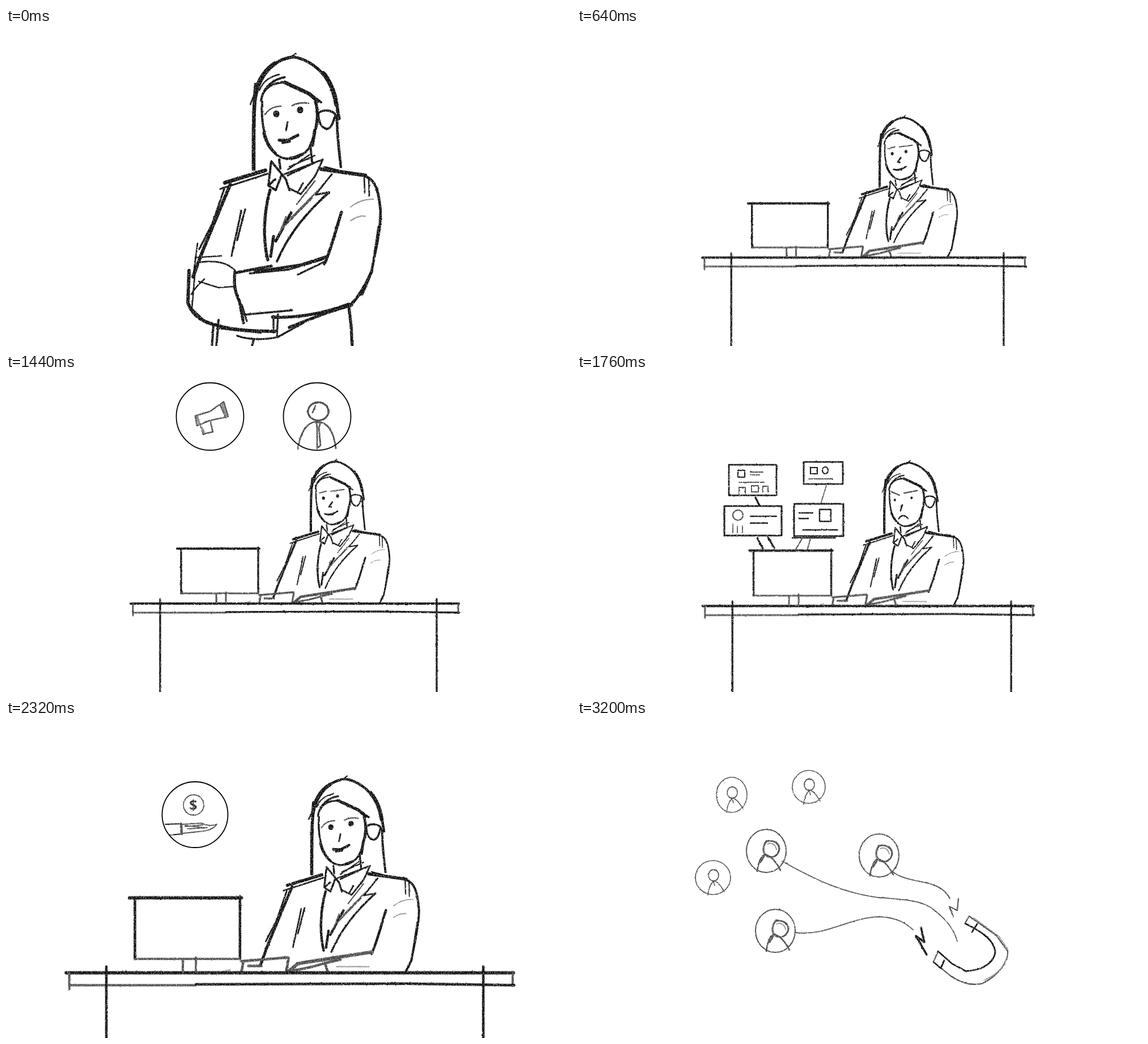
Animation, 997 px wide and 561 px high, one loop 3360 ms. Source, as an HTML page:

```html
<!DOCTYPE html>
<html lang="en">
<head>
<meta charset="utf-8">
<title>Storyboard sketches</title>
<style>
html, body { margin: 0; width: 100%; height: 100%; overflow: hidden; background: #fff; }
svg { display: block; width: 100%; height: 100%; }
.scene { opacity: 0; }
path, circle, ellipse { fill: none; stroke-linecap: round; stroke-linejoin: round; }
text { font-family: "Open Sans", "Noto Sans", sans-serif; fill: #333; }
</style>
</head>
<body>
<svg id="stage" viewBox="0 0 997 561"></svg>
<script>
const LOOP = 3360;
const INK = '#141414', GREY = '#4c4c4c', PALE = '#888';

const ink = (width, d, color = INK) =>
  `<path d="${d}" stroke="${color}" stroke-width="${(width * 1.1).toFixed(2)}"/>`;
const brush = (width, d, color) => ink(width * 1.2, d, color);
const oval = (x, y, rx, ry = rx, width = 2, color = INK) =>
  `<ellipse cx="${x}" cy="${y}" rx="${rx}" ry="${ry}" stroke="${color}" stroke-width="${width * 1.1}"/>`;
const place = (scale, x, y, ...parts) =>
  `<g transform="translate(${x} ${y}) scale(${scale})">${parts.join('')}</g>`;
const rough = (...parts) => `<g filter="url(#pencil)">${parts.join('')}</g>`;
const box = (x, y, w, h) => `M${x} ${y}h${w}v${h}h${-w}z`;

const pencil = `<defs><filter id="pencil" filterUnits="userSpaceOnUse" x="0" y="0" width="997" height="561"
  color-interpolation-filters="sRGB">
  <feTurbulence type="fractalNoise" baseFrequency=".2" numOctaves="2" seed="4" result="wobble"/>
  <feDisplacementMap in="SourceGraphic" in2="wobble" scale="2.2" xChannelSelector="R" yChannelSelector="G" result="line"/>
  <feTurbulence type="fractalNoise" baseFrequency=".5" numOctaves="2" seed="9"/>
  <feColorMatrix values="0 0 0 0 0  0 0 0 0 0  0 0 0 0 0  0 0 0 -2.2 2.1" result="grain"/>
  <feComposite in="line" in2="grain" operator="in"/>
</filter></defs>`;

// Woman: head, jacket and upper arms
const hair =
  brush(4, 'M439 132C444 88 470 54 508 51C545 58 574 90 582 125L588 160') +
  brush(6, 'M442 108C449 85 460 72 474 63M560 80C574 97 580 115 583 135') +
  brush(2, 'M497 55L511 45M431 135L444 102M447 110C455 92 466 86 482 82') +
  brush(5, 'M441 100C436 150 437 200 437 249') +
  brush(3.5, 'M584 155C584 190 588 220 591 245') +
  brush(3, 'M450 128C453 108 466 97 490 96C515 103 540 118 556 131M455 112C465 96 478 89 492 87') +
  brush(5, 'M492 96L535 116L550 129');
const head =
  brush(3, 'M452 130C450 160 454 195 470 215C480 230 495 233 512 229C530 222 541 210 544 180') +
  brush(4, 'M546 130C552 148 549 170 545 182L541 207M455 185C458 200 465 212 476 222') +
  brush(3, 'M551 150C560 143 575 145 581 152C578 165 575 177 566 178C556 176 551 165 551 150') +
  brush(3, 'M482 232L484 248M537 206L540 236') +
  brush(2, 'M497 250L535 224M500 245L545 225M495 232L530 219');
const jacket =
  brush(3, 'M468 235L463 278L476 286L486 260M468 235L494 267L500 286M463 278L475 267') +
  brush(2.5, 'M491 258L559 232L545 262L520 293L500 283M497 260L546 237M515 290L524 274') +
  brush(5, 'M386 273L458 251M556 249L634 260') +
  brush(2.5, 'M378 284L462 257M562 245L585 251M575 258L546 294L570 290') +
  brush(4, 'M466 286C456 320 452 370 462 409M472 368L467 403M503 326L476 376') +
  brush(3, 'M570 290C534 322 500 360 478 412') +
  brush(2, 'M550 287L503 335M540 300L486 355M494 333L483 362M545 270L513 311', GREY) +
  brush(4.5, 'M396 276C377 320 360 362 344 401L330 439') +
  brush(2.5, 'M385 284L364 345L341 390M415 322C410 350 402 380 398 402M422 320L408 374') +
  brush(3.5, 'M635 262C651 268 658 285 661 325C661 360 650 400 645 430L634 452') +
  brush(2, 'M632 260L633 291M640 265L641 296M657 350L648 410') +
  brush(1.4, 'M608 316C620 306 635 302 648 302M608 340C618 333 626 331 634 332', PALE) +
  brush(4, 'M592 325C582 355 574 390 562 416');
const woman = face => hair + head + jacket + face;

const eyes = (x1, y1, x2, y2, r) => ink(r * 2, `M${x1} ${y1}v1M${x2} ${y2}v1`);
const smile =
  eyes(477, 151, 519, 144, 5) +
  brush(2, 'M457 153C464 142 473 138 485 138M505 137C514 132 523 131 534 133', GREY) +
  brush(2.5, 'M497 166L494 181') + brush(4, 'M482 198L498 198L515 189M488 202L500 200');
const working =
  eyes(473, 155, 513, 149, 3.8) +
  brush(2.5, 'M461 141L481 136M494 136L532 131', GREY) +
  brush(3.5, 'M498 167L489 180L495 181') + brush(3.5, 'M477 201C488 204 502 200 513 193M485 203L500 202');
const frown =
  eyes(467, 156, 514, 150, 3) +
  brush(3, 'M457 133L479 143M493 137L530 130', GREY) +
  brush(3, 'M488 170L483 186') + brush(3, 'M478 210C482 200 494 196 504 209');

const crossedArms =
  brush(4, 'M404 432L468 420M440 430L520 418L567 403M404 430C402 450 403 465 412 482L419 520') +
  brush(2.5, 'M430 433L500 426L560 408M515 435L565 411M416 488L425 517M418 506L505 498') +
  brush(2, 'M334 405L380 402M338 414C370 408 395 415 406 430M327 470C335 455 343 450 350 443M340 447L375 458L402 456') +
  brush(4.5, 'M323 428L321 485C330 510 350 520 375 525C400 534 440 535 475 535') +
  brush(2, 'M334 425L328 495L352 518M338 380L330 440M372 530L450 538') +
  brush(4, 'M470 510C515 512 560 504 605 487M500 528C540 512 570 500 610 489') +
  brush(2.5, 'M408 543C430 551 460 550 480 545L525 520M480 505L478 545M472 508L472 530') +
  brush(4, 'M634 452C625 470 615 482 605 492L609 525L611 565M645 430L628 470') +
  brush(3, 'M375 515L371 565M366 525L363 565M437 550L433 565');

// Desk with monitor and seated woman
const desk = (face, ...extras) =>
  place(0.62, 267, 122.5, woman(face)) +
  ink(4, 'M616 378L520 393L508 403', GREY) +
  ink(3, 'M512 402C540 399 555 391 575 388M447 390L507 385M447 403L449 393M456 396H473M508 386L505 402M555 392L558 402', GREY) +
  ink(1.2, 'M570 397H612M408 407L432 401', PALE) +
  ink(3.8, 'M220 405H799M302 308H447') +
  ink(2.6, 'M226 421H388M224 405V426M798 404V422', GREY) +
  ink(3, 'M388 420L660 419L800 421M272 397V575M760 397V575M309 308V387M445 306V387') +
  ink(2.6, 'M309 387H445M371 387V404M388 385V404', GREY) +
  extras.join('');

const ring = (x, y, r) => `<circle cx="${x}" cy="${y}" r="${r}" stroke="#000" stroke-width="1.8"/>`;
const megaphone =
  ink(2.4, 'M334 74L360 66L384 49L392 75L360 82L337 91ZM378 55L388 77M343 91L348 106L365 102L361 85', GREY) +
  ink(4, 'M382 53L389 74M338 76L341 89M345 95L349 103', PALE);
const applicant =
  oval(551, 66, 18, 16, 3, GREY) +
  ink(2.5, 'M515 132C519 105 530 85 548 84C570 84 579 106 582 131M548 86L555 85L552 95L555 126L549 131L549 96ZM541 68L546 56', GREY);
const payHand =
  oval(331, 150, 18, 18, 1.6, GREY) +
  '<text x="330.5" y="159" font-size="25" font-weight="700" text-anchor="middle">$</text>' +
  ink(2, 'M281 184L310 183M288 203L311 201') + ink(4, 'M309 183L310 201', GREY) +
  ink(1.8, 'M311 184L345 182C358 188 366 186 372 184C366 193 355 196 340 197L311 200M316 188L348 185M320 192L355 190M316 186L350 190', GREY);

const lowCards =
  ink(2.8, box(260, 233, 101, 52) + box(383, 229, 87, 57)) +
  ink(2.2, 'M306 251H352M306 263H336M392 245H416M392 255H408M398 275H460M380 289H456') +
  ink(2.2, box(428, 239, 20, 21)) + oval(284, 249, 9, 9, 2, GREY) +
  ink(1.6, 'M275 265V280M283 269V280M292 268V280', GREY) +
  ink(3, 'M318 289L328 308M337 288L348 307') + ink(2, 'M398 289L385 311M412 290L407 308', GREY);
const topCards =
  ink(2.5, box(268, 160, 84, 54) + box(400, 155, 69, 39)) +
  ink(2, box(284, 170, 12, 12) + box(412, 165, 12, 11)) + oval(438, 170, 5, 6) +
  ink(1.8, 'M306 173H328M306 178H322M286 191H330M409 185H451M286 212V200H297V212M308 208V197H320V208ZM328 208V198H337V208', GREY) +
  ink(3, 'M315 218L322 232') + ink(1.6, 'M440 197L431 226', GREY);

// Woman from behind, with thought bubbles
const bubbles =
  [[355, 126], [498, 99], [640, 121], [262, 238], [738, 236]].map(([x, y]) => oval(x, y, 55, 56, 2.8)).join('') +
  ink(1.8, 'M312 91L370 92M317 115H370M320 138H365M330 158H355M317 88L328 178M370 90V116', GREY) +
  oval(372, 124, 13, 14, 2.4) + ink(2.2, 'M353 180C352 150 360 140 372 138C382 140 386 155 385 180') +
  oval(489, 68, 12, 13, 2.4) + oval(488, 69, 6, 8, 1.5) +
  ink(2.2, 'M466 150C462 110 468 82 486 80C505 82 508 110 507 143M472 88L469 130M508 78L552 99M512 85L545 95M510 94L510 122') +
  ink(2.4, 'M634 92C634 80 645 78 650 88C655 98 670 92 669 105C665 122 645 120 640 112C634 106 634 100 634 92M632 125C645 140 645 150 633 157M668 115C675 130 678 145 676 155') +
  ink(2, 'M588 125L622 118M590 138L630 125M595 152L632 135M600 118C602 100 612 98 616 112L627 130M690 122C680 130 675 150 672 160') +
  ink(2, 'M222 228C228 222 233 226 230 234L224 245L248 275M248 292C248 270 258 260 265 260C275 265 276 280 274 292M262 210C272 222 285 214 306 210') +
  ink(3.4, 'M254 235L256 256L263 232L266 254L274 236L280 250L284 232L289 257L296 237L301 250L305 238L312 256') +
  oval(704, 217, 10, 10, 2.4) +
  ink(2.2, 'M696 245C694 230 700 228 704 228C712 232 712 250 708 258M718 225C724 240 726 255 721 262M725 241H792M732 222C735 205 742 205 746 216L765 237M765 208V238M777 207V240M742 270L760 250L764 266L775 254') +
  ink(1.3, 'M700 275L722 282', PALE);
const fromBehind =
  ink(4, 'M450 211H406V296L430 298M520 211H577V300L562 302') +
  ink(3, 'M325 310L430 305M566 311L675 308L692 345M311 350H430M311 350V483M333 352V443M594 355V470') +
  ink(2, 'M325 310L307 350M594 465H695M597 465L642 458', GREY) +
  ink(3.5, 'M566 352L692 345M695 348V466M691 466L694 487') +
  ink(3.5, 'M488 203C468 218 451 235 454 275C456 310 470 345 490 350C508 354 521 348 524 335C526 300 525 250 520 228C512 212 500 203 488 203') +
  ink(2, 'M485 208C462 230 450 255 452 285M508 230L517 240M470 330C480 350 505 358 520 350', GREY) +
  ink(3, 'M437 340C432 380 433 405 440 418C460 434 535 434 550 420C560 410 560 380 556 350C552 320 545 305 530 300') +
  ink(2, 'M452 280C430 290 428 320 436 350M528 281C555 278 560 300 565 325L573 378M460 312C448 330 440 360 436 400M535 292C550 295 556 320 560 360', GREY) +
  ink(4, 'M460 432L438 505M538 432L560 508') + ink(3, 'M468 432L455 488M524 432L532 490');

// Contact list
const listRow = y => place(1, 0, y,
  ink(4.4, 'M322 107H662M323 108V158M660 106V157') + ink(3.4, 'M323 157H662') +
  oval(363, 130, 20, 16, 2.6, GREY) +
  ink(3.6, 'M394 120L480 121') + ink(3, 'M394 120L600 121') + ink(1.6, 'M397 136H562', PALE));
const contactList =
  [0, 98, 197, 295].map(listRow).join('') +
  '<text x="363" y="432" font-size="20" text-anchor="middle">V</text>' +
  '<text transform="translate(750 363) rotate(-30)" font-size="43" font-style="italic">Vomu</text>' +
  ink(2, 'M733 349C708 346 680 365 671 391M669 367L670 391L694 376', GREY);

// People and magnet
const avatar = (x, y, scale = 1, thin = 1) => place(scale, x, y,
  oval(0, 0, 35, 38, 1.9 * thin, GREY) +
  ink(2.8 * thin, 'M0 -17C10 -20 23 -15 23 -3C21 8 12 13 5 10C-5 9 -9 -5 0 -17', GREY) +
  ink(1.5 * thin, 'M2 -12C10 -16 17 -10 18 -2M-4 -12C-9 0 -4 8 2 11', PALE) +
  ink(2.4 * thin, 'M-16 36C-14 20 -9 9 -2 6C8 9 18 20 25 34M-10 20L-4 10', GREY));
const smallPerson = (x, y, rx, ry) => place(1, x, y,
  oval(0, 0, rx, ry, 1.5, GREY) + oval(1, -4, 9, 10, 1.6, GREY) +
  ink(1.5, 'M-9 31C-8 18 -3 9 2 6C10 8 15 17 20 25M0 5L3 14', GREY));
const crowd = avatar(334, 231) + avatar(533, 239) + avatar(350, 372);
const magnet =
  ink(1.7, 'M362 249C420 282 470 305 530 313C580 317 610 318 630 335C655 355 665 370 671 390M556 267C575 282 600 283 620 288C640 293 652 303 658 315M385 375C440 382 480 348 535 347C565 349 580 358 593 370', GREY) +
  ink(3.2, 'M617 414L598 381L613 392L607 366') + ink(2, 'M664 347L657 329L671 336L673 315', GREY) +
  ink(2, 'M685 358L692 346L740 380L760 408C762 425 745 450 715 465C700 468 680 466 660 452L629 427L637 408', GREY) +
  ink(2.6, 'M637 408L662 430L686 443C715 442 737 428 738 408C735 390 720 376 685 359M648 424L642 438M629 427L642 438M706 360L697 374') +
  ink(1.4, 'M700 349L745 382L760 404M758 420C750 442 735 452 718 459', PALE);

const wide = [1.363, -193.7, -106], near = [1.008, 0, 1], mid = [0.97, 14.5, 4];

// [start in ms, drawing]
const scenes = [
  [0, rough(woman(smile), crossedArms)],
  [320, rough(bubbles, fromBehind)],
  [640, rough(place(0.985, 4.3, 6, desk(working)))],
  [880, rough(contactList)],
  [1200, rough(place(...mid, desk(working, megaphone))) + place(...mid, ring(360, 75, 59.5))],
  [1440, rough(desk(working, megaphone, applicant)) + ring(360, 75, 59.5) + ring(549, 75, 59.5)],
  [1760, rough(place(...near, desk(frown)), lowCards, topCards)],
  [2080, rough(place(1.04, -12, -8, desk(frown)), place(1.032, -12, -9, lowCards, topCards, place(1, 0, -57, topCards)))],
  [2320, rough(place(...wide, desk(smile)), payHand) + ring(333.5, 167, 58)],
  [2640, rough(avatar(222, 292, 2.95, 0.5), avatar(500, 292, 2.95, 0.5), avatar(778, 292, 2.95, 0.5))],
  [2880, rough(place(1, 0, -6, crowd))],
  [3200, rough(crowd, magnet, smallPerson(273, 132, 27, 31), smallPerson(409, 118, 29, 29), smallPerson(240, 278, 31, 30))],
];

const stage = document.getElementById('stage');
stage.innerHTML = pencil + scenes.map(([, art]) => `<g class="scene">${art}</g>`).join('');

stage.querySelectorAll('.scene').forEach((scene, i) => {
  const start = scenes[i][0] / LOOP;
  const end = i + 1 < scenes.length ? scenes[i + 1][0] / LOOP : 1;
  const steps = [[start, 1], [end, 0]];
  if (start > 0) steps.unshift([0, 0]);
  if (end < 1) steps.push([1, 0]);
  scene.animate(
    steps.map(([offset, opacity]) => ({ offset, opacity, easing: 'step-end' })),
    { duration: LOOP, iterations: Infinity, fill: 'both' }
  );
});
</script>
</body>
</html>
```
